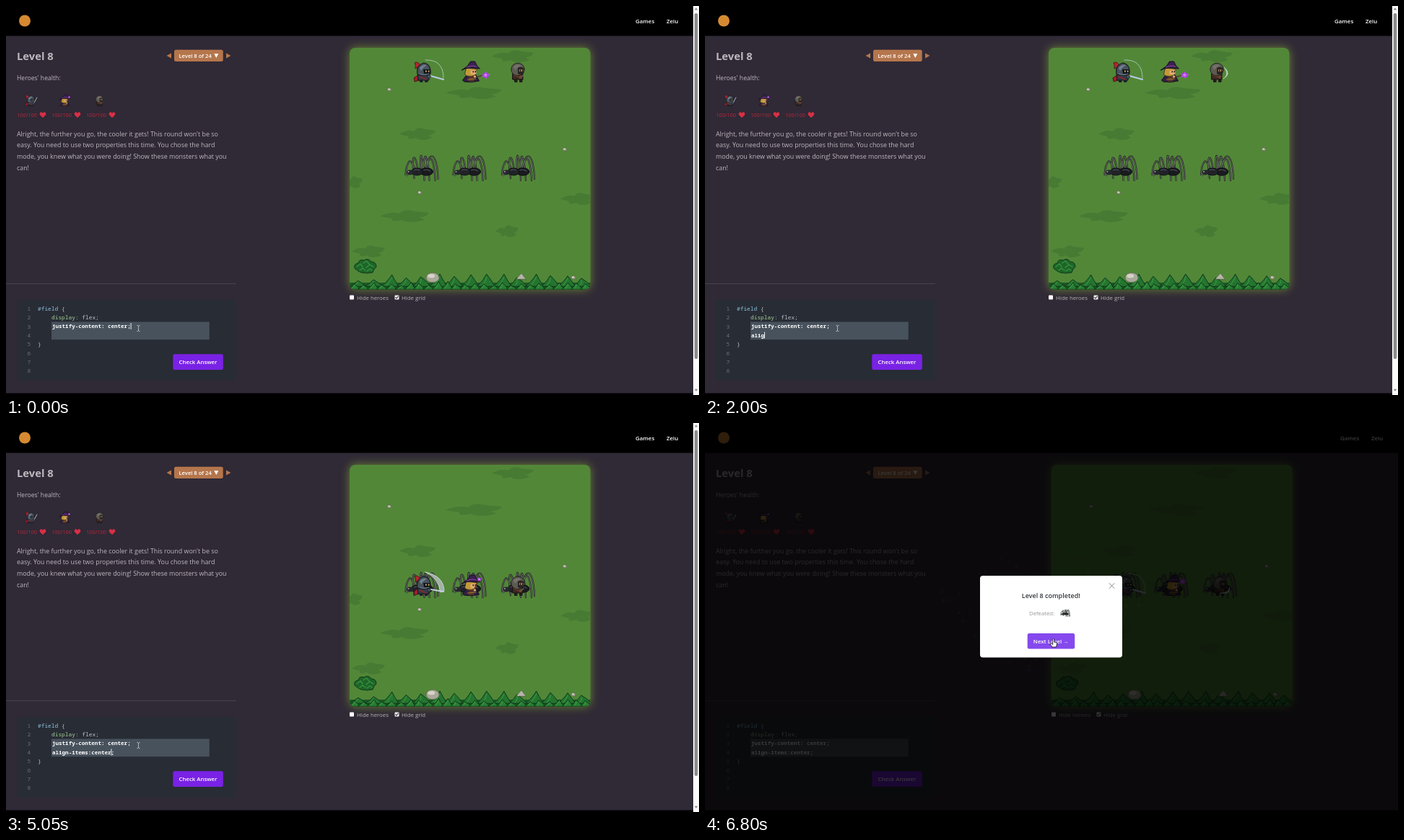
Write an HTML page that moves like this. It is 960 px wide and 540 px high and loops after 6850 ms.

```html
<!DOCTYPE html>
<html lang="en">
<head>
<meta charset="utf-8">
<title>Level 8</title>
<style>
html, body { margin: 0; width: 100%; height: 100%; overflow: hidden; background: #000; }
svg { display: block; width: 100vw; height: 100vh; }
text { font-family: "Open Sans", "Noto Sans", sans-serif; white-space: pre; }
.bold { font-weight: 600; }
.code { font-family: "Noto Sans Mono", "DejaVu Sans Mono", monospace; font-size: 7.83px; }
.entry { font-size: 7.55px; font-weight: 700; fill: #fff; }
</style>
</head>
<body>
<svg id="stage" viewBox="0 0 960 540"></svg>
<script>
const LOOP = 6850, STEP = 50;
const KEYS = [1700, 1800, 1900, 2000, 2100, 2250, 2950, 3050, 3150, 3250, 3350, 3500,
  3700, 3850, 4000, 4250, 4450, 4700];
const TYPED = 'align-items:center', CHAR = 4.53, ENTRY_X = 64;
const NEXT_LINE = 1600, SOLVED = 4700, CLICK = 5400, MODAL = 6150;
const CONFETTI = ['#26ccff', '#a25afd', '#ff5e7e', '#88ff5a', '#fcff42', '#ffa62d', '#ff36ff'];

const clamp = v => Math.max(0, Math.min(1, v));
const ease = v => { v = clamp(v); return v * v * (3 - 2 * v); };
const lerp = (a, b, k) => a + (b - a) * k;
const range = (n, fn) => Array.from({ length: n }, (_, i) => fn(i));
function seeded(seed) {
  return () => {
    seed = (seed * 16807) % 2147483647;
    return seed / 2147483647;
  };
}

const path = (d, fill, stroke = 'none', width = 1) =>
  `<path d="${d}" fill="${fill}" stroke="${stroke}" stroke-width="${width}" stroke-linecap="round" stroke-linejoin="round"/>`;
const line = (d, stroke, width) => path(d, 'none', stroke, width);
const rect = (x, y, w, h, fill, r = 0, extra = '') =>
  `<rect x="${x}" y="${y}" width="${w}" height="${h}" rx="${r}" fill="${fill}" ${extra}/>`;
const oval = (x, y, rx, ry, fill, extra = '') =>
  `<ellipse cx="${x}" cy="${y}" rx="${rx}" ry="${ry}" fill="${fill}" ${extra}/>`;
const label = (x, y, str, size, fill, extra = '') =>
  `<text x="${x}" y="${y}" font-size="${size}" fill="${fill}" ${extra}>${str}</text>`;
const code = (x, y, str, fill, cls = '') => `<text x="${x}" y="${y}" class="code ${cls}" fill="${fill}">${str}</text>`;
const at = (x, y, content, scale = 1) => `<g transform="translate(${x} ${y}) scale(${scale})">${content}</g>`;
const BOLD = 'class="bold"', MIDDLE = 'class="bold" text-anchor="middle"';

// Sprites, drawn around their own centre
const SWORDS = {
  slash: line('M4 -17Q29 -18 29 8', '#b9d2c4', .8) + line('M11 5L29 10', '#b9cbe2', 2),
  forward: line('M11 5L26 10', '#3f4f66', 2.8) + line('M11 5L26 10', '#a9c8f0', 1.6),
  raised: line('M2 -5L-8 -19', '#3c4656', 2.6) + line('M2 -5L-8 -19', '#a7bbd2', 1.4),
  sweep: path('M4 -19Q29 -14 30 7L25 9Q22 -11 4 -19Z', '#a3b2aa', '#d8e2dd', .8) + line('M11 5L29 8', '#c2cde0', 2),
  held: line('M9 7L17 -8', '#a9bccf', 1.8)
};
const knight = pose =>
  path('M-5 3L-12 8L-11 13L-4 11Z', '#a31e2a', '#2b1418', .8) +
  path('M-3 -10Q-7 -16 -11 -13Q-9 -10 -10 -5L-7 -7Q-8 -2 -6 0Z', '#b52631', '#3a1519', .8) +
  rect(-4, 9, 4.5, 5, '#1e222a', 1) + rect(3, 9, 4.5, 5, '#1e222a', 1) +
  path('M-6 3H9L9 11H-6Z', '#343b46', '#15181d', 1) + line('M-4 6L5 10', '#8e2830', 1.4) +
  path('M-7 3Q-9 -10 2 -13Q12 -11 11 2Q3 6 -7 3Z', '#47525d', '#14181d', 1.1) +
  path('M-4 -6Q0 -11 6 -10Q1 -7 -2 -2Z', '#71818d') +
  path('M1 -4H11V2H2Z', '#10151b') + rect(4, -2.6, 1.7, 2.4, '#c9a671') + rect(7.8, -2.6, 1.7, 2.4, '#c9a671') +
  line('M-4 2Q2 5 9 2', '#77858e', 1) +
  SWORDS[pose] + oval(9, 6, 2.3, 2.3, '#4c565f', 'stroke="#171b20" stroke-width=".7"');

const ORBS = { cast: [20, 4, 4.5], rest: [14, -1, 2.8], raise: [11, -9, 2.6], charge: [13, -6, 4] };
function mage(pose) {
  const [x, y, r] = ORBS[pose];
  return path('M-5 2L-12 11L-10 13Q0 15 11 12L6 3Z', '#33203f', '#160f1c', 1) +
    path('M-3 5L-4 13H4L3 5Z', '#54362c') + line('M-5 10L6 9', '#a77a2b', 1.1) +
    path('M-7 -6L-9 3L-6 5Q0 7 5 4L8 -4Z', '#c39a39', '#3a2718', .8) +
    oval(3, 0, 4.2, 3.6, '#e2ad75') + rect(2, -2, 1.4, 2.4, '#342018') + rect(5, -2, 1.4, 2.4, '#342018') +
    path('M-13 -3Q-5 -8 12 -5L8 -9L5 -15L-1 -15L-5 -9Z', '#3b2150', '#180e21', 1) +
    line('M-6 -7Q1 -10 7 -8', '#7b4293', 1.2) +
    line(`M3 7L${x} ${y}`, '#523627', 1.6) + oval(5, 6, 1.8, 1.8, '#d6a471') +
    oval(x, y, r, r * .85, '#a63fe0') + oval(x, y, r * .45, r * .4, '#efa5ff') +
    (r > 3.5 ? line(`M${x - r - 1} ${y + 2}L${x + r + 1} ${y - 1}M${x} ${y - r}L${x + 1} ${y + r}`, '#c85bf2', .9) : '');
}

const BLADES = {
  stand: line('M3 8L8 4', '#6e7070', 1.3),
  low: path('M1 10Q12 10 14 2Q16 13 1 10Z', '#b7c9c8', '#dce6df', .5),
  swing: path('M9 9Q18 3 10 -7Q21 2 9 9Z', '#b7c9c8', '#dce6df', .5)
};
const scout = pose =>
  rect(-5, 9, 4.5, 5, '#221d1b', 1) + rect(2, 9, 4.5, 5, '#221d1b', 1) +
  path('M-7 2H7L7 10H-7Z', '#3b2a24', '#171211', 1) + line('M-5 4L5 8', '#6f3c28', 1.8) +
  oval(0, -4, 9.2, 8.8, '#5d5a53', 'stroke="#25221f" stroke-width="1"') +
  path('M-6 -8Q-1 -13 5 -9Q0 -8 -4 -3Z', '#74716a') +
  path('M0 -6Q5 -9 9 -5L8 2Q4 5 0 2Z', '#2a2522') + rect(2, -4, 5.6, 3, '#a9825c') +
  rect(3, -3.6, 1.3, 2.4, '#16100d') + rect(6, -3.6, 1.3, 2.4, '#16100d') +
  BLADES[pose] + oval(4, 6, 1.8, 1.8, '#70452d');

const LEGS = ['M-8 3Q-14 -13 -17 -10Q-21 -5 -22 8', 'M-5 2Q-8 -18 -11 -15Q-13 -8 -10 13', 'M-1 1Q-2 -20 0 -18Q4 -6 4 16',
  'M2 1Q4 -18 6 -17Q10 -8 11 16', 'M6 1Q10 -20 16 -17Q22 -11 23 14', 'M5 1Q10 -16 14 -13Q18 -6 19 16'].join('');
const spider = line(LEGS, '#20241f', 2.3) + line(LEGS, '#6a6d69', 1) +
  oval(7, 4, 9, 5.2, '#1a1b1f', 'stroke="#0d0e10"') + oval(-6, 4, 8, 5, '#202227', 'stroke="#0d0e10"') +
  oval(-16, 5, 4.5, 3.6, '#26272d') + line('M-20 6L-22 8M-18 8L-20 10', '#4a4b4e', 1.2) +
  line('M3 2Q8 0 12 3M-10 2Q-6 0 -3 2', '#50535d', 1.1) + oval(-18, 4, 1, .9, '#9b9fa0');

const patch = (x, y, w) => path(
  `M${x - w} ${y}Q${x - w * .6} ${y - 7} ${x - w * .2} ${y - 4}Q${x} ${y - 11} ${x + w * .4} ${y - 7}` +
  `L${x + w} ${y - 5}Q${x + w * .9} ${y + 1} ${x + w * .6} ${y + 1}L${x + w * .8} ${y + 5}` +
  `Q${x + w * .2} ${y + 11} ${x - w * .1} ${y + 5}Q${x - w * .6} ${y + 9} ${x - w * .5} ${y + 3}Z`, '#477a33');
const stone = (x, y, r) => oval(x, y, r, r * .75, '#aaa99b', 'stroke="#5c6550" stroke-width=".7"') +
  oval(x - r * .2, y - r * .25, r * .55, r * .3, '#d5d3c5');

function hedge() {
  const rnd = seeded(73);
  let leaves = rect(476, 384, 334, 10, '#1c5a27');
  const row = (count, base, height, width, fill) => range(count, i => {
    const x = 476 + (i + .5) * 334 / count, h = height * (.45 + rnd() * .55), lean = (rnd() - .5) * width * .5;
    leaves += path(`M${x - width} ${base}Q${x - width * .3 + lean} ${base - h * .55} ${x + lean} ${base - h}` +
      `Q${x + width * .5} ${base - h * .6} ${x + width} ${base}Z`, fill, '#11371a', 1) +
      line(`M${x + lean} ${base - h * .75}Q${x} ${base - h * .4} ${x - width * .4} ${base - 1}`, '#43a149', .9);
  });
  row(15, 389, 17, 12, '#24752f');
  row(26, 393, 11, 7.5, '#277f33');
  return leaves;
}

const bush = path('M-15 3Q-17 -3 -10 -4Q-9 -10 -2 -8Q4 -12 8 -6Q15 -6 15 1Q13 4 12 4L10 9Q2 11 -6 9L-10 7Z',
  '#1d6528', '#123a1a', 1) + line('M-12 1L-7 -3L-4 1M-3 -4L1 -7L5 -3M1 2L6 -2L11 1M-8 6L-4 3L0 6M2 7L6 4L9 6', '#37933d', 1.3);

const field = rect(476, 58, 333.5, 335.5, '#6c8434', 8, 'filter="url(#glow)"') +
  `<g clip-path="url(#turf)">` + rect(476, 58, 334, 336, '#528738') +
  [[648, 121, 39], [570, 178, 25], [702, 70, 29], [792, 268, 24], [480, 245, 14], [552, 292, 34], [694, 313, 16], [502, 341, 23]]
    .map(p => patch(...p)).join('') +
  at(498, 361, bush) +
  [[531, 116, 2.8], [774, 199, 2.8], [573, 259, 2.8]].map(s => stone(...s)).join('') + hedge() +
  stone(591, 377, 9) + path('M707 379L714 371L720 379Z', '#b6b5a8', '#59624f', .7) + stone(786, 377, 3) + '</g>' +
  rect(476, 401.5, 6, 6, '#fff', 1) + label(486, 407.7, 'Hide heroes', 7.8, '#b7b3b9') +
  rect(538.5, 401.5, 6, 6, '#eee', 1) + line('M539.8 404.6L541 406L543.3 403', '#33303a', 1.1) +
  label(548, 407.7, 'Hide grid', 7.8, '#b7b3b9') +
  [575.5, 641.5, 709].map(x => at(x, 226, spider)).join('');

const health = [knight('held'), mage('raise'), scout('stand')].map((hero, i) =>
  at(33.5 + 48 * i, 131.5, hero, .55) + label(15 + 48 * i, 153.7, '100/100', 7.4, '#b92a3d') +
  at(51 + 48 * i, 151, path('M0 4.2L-4 .3Q-5.2 -2 -3.2 -3.4Q-1 -4.3 0 -2Q1 -4.3 3.2 -3.4Q5.2 -2 4 .3Z', '#d92f44'))).join('');
const story = ["Alright, the further you go, the cooler it gets! This round won't be so",
  'easy. You need to use two properties this time. You chose the hard',
  'mode, you knew what you were doing! Show these monsters what you', 'can!']
  .map((row, i) => label(15, 180.7 + 15.75 * i, row, 8.88, '#bdb8bf')).join('');

const page = rect(0, 0, 960, 540, '#302936') + rect(0, 0, 960, 41.5, '#000') + rect(0, 537.5, 960, 2.5, '#000') +
  oval(26, 20.5, 8, 8, '#d58a32') +
  label(15, 74.5, 'Level 8', 14.8, '#bdb8bd', 'font-weight="700"') +
  path('M222.5 69L229 65.5V72.5ZM311.5 69L305 65.5V72.5Z', '#b6764a') +
  rect(233, 60.7, 67.7, 16.3, '#b5764c', 2.5) + label(239.5, 71.7, 'Level 8 of 24', 7.6, '#fff', BOLD) +
  path('M288.3 66.3H294.3L291.3 72Z', '#fff') +
  label(15, 102.6, "Heroes' health:", 8.65, '#bdb8bf') + health + story +
  rect(0, 385, 319, 1, '#49434e') + rect(15, 408, 304, 112, '#282c35', 2) +
  range(8, i => code(29.5, 422.8 + 12.35 * i, i + 1, '#69737b')).join('') +
  code(44, 422.8, '<tspan fill="#8fc3dd">#field</tspan> {', '#c2c6cb') +
  code(63, 435.2, '<tspan fill="#a4cf94">display</tspan>: flex;', '#b9c0c8') +
  code(44, 471.8, '}', '#c2c6cb') + rect(63, 438.5, 218.8, 24.6, '#48525d') +
  code(ENTRY_X, 447.3, 'justify-content: center;', '#fff', 'entry');

const scrollbar = rect(952, 0, 8, 540, '#fbfbfb') + rect(953.7, 10, 4.6, 480, '#8b8b8b', 2.3) +
  path('M953.8 5.5H958.2L956 2.3ZM953.8 531.7H958.2L956 535Z', '#8b8b8b');

const dialog = rect(381, 212, 197, 113.5, '#fff', 4) + line('M560 222.5L567 229.5M567 222.5L560 229.5', '#888', 1) +
  label(479.3, 243, 'Level 8 completed!', 9, '#33363b', MIDDLE) + label(449, 267.3, 'Defeated:', 7.75, '#979797') +
  at(499, 264, spider, .28) + rect(446.7, 292, 65.5, 21.5, '#8549ed', 2.5) +
  label(479.4, 305.5, 'Next Level →', 7.8, '#fff', MIDDLE);

const ibeam = line('M-1.7 -4Q0 -4 0 -3Q0 -4 1.7 -4M0 -3V3M-1.7 4Q0 4 0 3Q0 4 1.7 4', '#d9dde0', .7);
const hand = path('M-1 -5Q0 -6 1 -5V-1L4 -.3Q5.3 0 5 2L4 6H-1.5L-4.3 2Q-4.5 .5 -3 1L-1 2.3Z', '#fff', '#111', .8);

const stage = document.getElementById('stage');
stage.innerHTML = `<defs>
  <filter id="glow" x="-20%" y="-20%" width="140%" height="140%"><feGaussianBlur stdDeviation="6.5"/></filter>
  <clipPath id="turf">${rect(476, 58, 333.5, 335.5, '#fff', 8)}</clipPath></defs>
  ${page}<g id="nav">${label(872, 24, 'Games', 7.9, '#fff', BOLD)}${label(915, 24, 'Zelu', 7.9, '#fff', BOLD)}</g>
  <g id="board">${field}<g id="heroes"></g></g><g id="editor"></g><g id="bar">${scrollbar}</g><g id="confetti"></g>
  ${rect(0, 0, 960, 540, '#000', 0, 'id="shade"')}<g id="dialog">${dialog}</g><g id="pointer"></g>`;
const part = id => stage.querySelector('#' + id);
const [nav, board, heroes, editor, bar, confetti, shade, modal, pointer] =
  ['nav', 'board', 'heroes', 'editor', 'bar', 'confetti', 'shade', 'dialog', 'pointer'].map(part);

// Each pose holds until its end time within the cycle.
const poseAt = (t, period, poses) => poses.find(([end]) => t % period < end)[1];

function drawHeroes(t) {
  const y = t < SOLVED ? 92 : 226;
  heroes.innerHTML =
    at(577, y, knight(poseAt(t, 400, [[50, 'slash'], [150, 'forward'], [250, 'raised'], [350, 'sweep'], [400, 'slash']]))) +
    at(644.5, y, mage(poseAt(t, 700, [[50, 'cast'], [100, 'rest'], [300, 'raise'], [550, 'charge'], [700, 'cast']]))) +
    at(709, y, scout(poseAt(t, 700, [[450, 'stand'], [550, 'low'], [650, 'swing'], [700, 'stand']])));
}

function drawEditor(t) {
  const count = KEYS.filter(k => k <= t).length;
  const entry = TYPED.slice(0, count) + (count >= 12 ? ';' : '');
  const onFirst = t < NEXT_LINE;
  const lastKey = count ? KEYS[count - 1] : onFirst ? -450 : NEXT_LINE;
  const caret = t < CLICK && Math.floor((t - lastKey) / 530) % 2 === 0;
  const hover = t >= 5300 && t < MODAL;
  editor.innerHTML = code(ENTRY_X, 459.6, entry, '#fff', 'entry') +
    (caret ? rect(ENTRY_X + CHAR * (onFirst ? 24 : count) - .1, onFirst ? 440 : 452.4, .9, 9, '#fff') : '') +
    rect(231.3, 483.3, 69.5, 21.6, hover ? '#8549ed' : '#7922e5', 2.5) +
    label(266, 497, 'Check Answer', 7.8, '#fff', MIDDLE);
}

function drawConfetti(t) {
  const ticks = (t - CLICK) / (1000 / 60), rnd = seeded(4211);
  confetti.innerHTML = ticks <= 0 ? '' : range(110, i => {
    const angle = (rnd() - .5) * 1.6, reach = (6 + rnd() * 16) * 10 * (1 - .9 ** ticks);
    const wobble = rnd() * 10 + ticks * .1, tilt = rnd() * 180 + ticks * 6;
    const x = 480 + Math.sin(angle) * reach + 4 * Math.cos(wobble);
    const y = 270 - Math.cos(angle) * reach + 1.5 * ticks;
    const thin = .6 + 1.4 * Math.abs(Math.sin(wobble));
    return oval(0, 0, 2.6, thin, CONFETTI[i % 7],
      `opacity="${clamp(1.2 - ticks / 80)}" transform="translate(${x} ${y}) rotate(${tilt})"`);
  }).join('');
}

function drawPointer(t) {
  const down = ease((t - 5080) / 250), up = ease((t - 6250) / 350);
  const x = lerp(lerp(183.5, 271.5, down), 482.5, up);
  const y = lerp(lerp(447.5, 507, down), 305, up);
  pointer.innerHTML = at(x, y, down < .3 ? ibeam : hand);
}

function render(t) {
  const open = clamp((t - MODAL) / 150), wide = t >= MODAL;
  drawHeroes(t);
  drawEditor(t);
  drawConfetti(t);
  drawPointer(t);
  nav.setAttribute('transform', `translate(${wide ? 8 : 0})`);
  board.setAttribute('transform', `translate(${wide ? 4 : 0})`);
  bar.setAttribute('visibility', wide ? 'hidden' : 'visible');
  shade.setAttribute('opacity', open * .78);
  modal.setAttribute('opacity', open);
  modal.setAttribute('transform', `translate(0 ${-25 * (1 - ease((t - MODAL) / 300))})`);
}

const start = performance.now();
function tick() {
  const t = (performance.now() - start) % LOOP;
  render(Math.floor(t / STEP) * STEP);
  requestAnimationFrame(tick);
}
tick();
</script>
</body>
</html>
```
